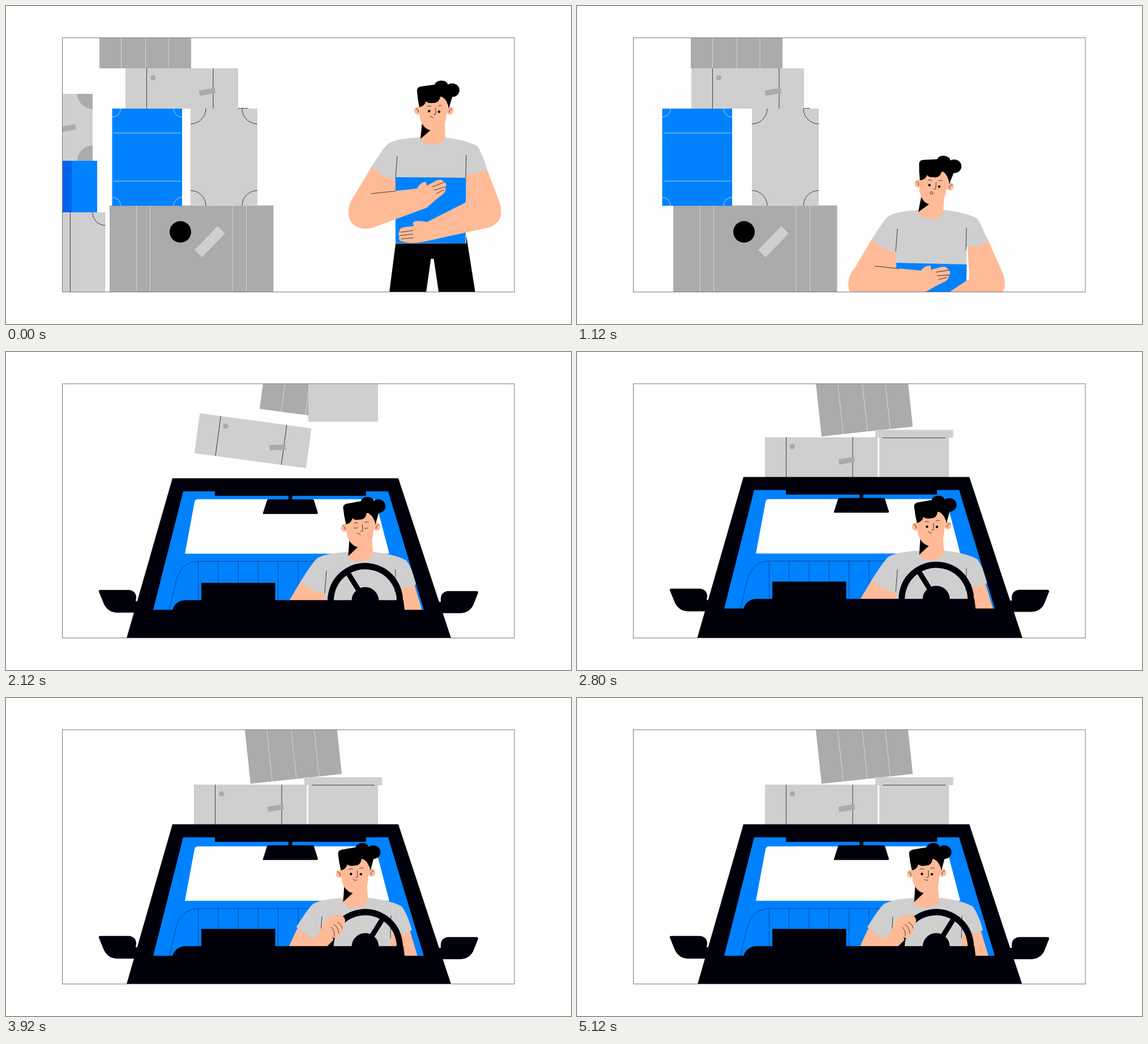
Animation, 998 px wide and 561 px high, one loop 5160 ms. Source, as an HTML page:

```html
<!DOCTYPE html>
<html lang="en">
<head>
<meta charset="utf-8">
<title>Moving day</title>
<style>
html, body { margin: 0; width: 100%; height: 100%; overflow: hidden; background: #fefefe; }
svg { display: block; width: 100vw; height: 100vh; }
.light { fill: #cfcfcf; } .dark { fill: #ababab; } .blue { fill: #0082ff; }
.skin { fill: #ffba97; } .car { fill: #00000a; }
.ink, .pale, .seam { fill: none; stroke: #222; stroke-width: .85; }
.pale { stroke: #dedede; }
.seam { stroke: #063f8c; }
</style>
</head>
<body>
<svg viewBox="0 0 998 561">
<clipPath id="stage"><rect x="99.5" y="56" width="799" height="449"/></clipPath>
<g clip-path="url(#stage)">

  <g id="leftPile">
    <path class="light" d="M20 155H153V273H20ZM20 364H175.500V505H20Z"/>
    <path class="dark" d="M126 155H153V182A27 27 0 0 1 126 155ZM153 246V273H126A27 27 0 0 1 153 246ZM80 216L122 208.500L124 217.500L80 226Z"/>
    <path class="blue" d="M100 273H161V364H100Z"/>
    <path fill="#0063ec" d="M20 273H116V364H20Z"/>
    <path class="ink" d="M113.500 364V505M153 364.500A22.500 22.500 0 0 0 175.500 387"/>
  </g>
  <g id="big">
    <circle cx="125" cy="46.500" r="19"/>
    <rect class="light" x="-29" y="-9.200" width="58.500" height="18.400" transform="translate(176.800 64) rotate(-45.700)"/>
  </g>
  <g id="blueBox"></g>
  <g id="tall"></g>
  <g id="ribbed"></g>
  <g id="crate"></g>
  <g id="lid"></g>
  <g id="long">
    <circle class="dark" cx="48.500" cy="16.500" r="4.700"/>
    <rect class="dark" x="-14.300" y="-4.700" width="28.600" height="9.400" transform="translate(144.500 41.300) rotate(-10)"/>
  </g>

  <g id="cabin">
    <path class="blue" d="M306 238H684L745 470H250Z"/>
    <path fill="#fff" d="M333 267Q334 262 339 262H648Q652 262 653 266L677 358H316Z"/>
    <path class="seam" d="M288.500 456L300 408Q308 372 341 371.500H580"/>
    <path class="seam" id="seams"/>
  </g>

  <g id="man">
    <path d="M690 405H813L829 506H764.500L755.500 446H750.500L742 506H677Z"/>
    <path id="leftArm" class="skin" d="M665 262L646 283L609 345Q599 370 613 385L650 391L689 360V290Z"/>
    <path id="rightArm" class="skin" d="M838 262L850 289L872 347Q878 368 869 380L840 391L812 360V285Z"/>
    <path class="light" d="M731 232Q695 233 676 242Q668 248 646 283Q663 302 688 306V419H813V297Q835 296 850 289Q842 260 832 247Q815 237 776 232Z"/>
    <path class="ink" d="M691 265L688 305M813 263L812 303"/>
    <path id="cargo" class="blue" d="M688 302L812.500 303L811.500 419L688 418Z"/>
    <g id="rightFore">
      <path class="skin" d="M872 347Q878 368 869 380Q862 389 848 392L737 416Q715 420 698 415Q692 411 695 407Q691 402 695 398Q694 391 705 390L721 388Q716 383 722 380Q730 378 744 381L813 346Z"/>
      <path class="ink" d="M697 399L719 396M695 405L719 402.500M698 411L720 409"/>
    </g>
    <g id="leftFore">
      <path class="skin" d="M609 345Q599 370 613 385Q626 397 648 391L743 356Q762 339 772 332Q778 326 776 321Q780 313 774 311Q769 304 760 308L743 317Q743 308 737 311Q730 314 726 322L645 331Z"/>
      <path class="ink" d="M645 331L688 326.500M753 319L774 311M756 325L776 319M760 331L774 324"/>
    </g>
    <g id="head">
      <path class="skin" d="M735 200L732 237Q740 245 755 245Q770 244 776 234L775 200Z"/>
      <path d="M735 206L750.500 218.500L732 234.500Z"/>
      <ellipse class="skin" cx="727.500" cy="184.500" rx="6.500" ry="7"/>
      <ellipse class="skin" cx="784" cy="184.500" rx="6.500" ry="7"/>
      <path class="skin" d="M729 160L731 198Q737 219 754 220Q774 217 777 200L782 160Z"/>
      <path d="M726 149Q726 143 733 142L762 138Q792 135 789 158L782 181Q780 166 770 160H767Q765 172 753 171Q745 172 742 168Q739 177 730 178.500Q727 165 726 149Z"/>
      <ellipse cx="769" cy="139.500" rx="11.500" ry="8"/>
      <ellipse cx="788" cy="148.500" rx="13" ry="12"/>
      <path class="ink" d="M724 181Q729 182 728 188M788 181Q782 183 783 188M744 177.500Q747 175 751 177M763 176.500Q767 174 770 176M759 179.500V191Q757 193 755 191"/>
      <g id="open"><circle cx="747.500" cy="185.500" r="2.200"/><circle cx="765" cy="186.500" r="2.200"/></g>
      <path id="shut" class="ink" d="M744 185Q747.500 187 751 185M762 186Q765.500 188 769 186"/>
      <path id="frown" class="ink" d="M749 195Q753 194.500 755 198"/>
      <ellipse id="puff" class="ink" cx="752.500" cy="199" rx="2.600" ry="2.200"/>
      <path id="smile" class="ink" d="M751 194Q754 199 758 196"/>
    </g>
  </g>

  <g id="frontCar">
    <g id="wheel">
      <circle cx="634.500" cy="439" r="61" fill="none" stroke="#00000a" stroke-width="11"/>
      <circle class="car" cx="634.500" cy="439" r="24"/>
      <path d="M634.500 439V380" stroke="#00000a" stroke-width="9"/>
    </g>
    <path id="driveArm" class="skin"/>
    <g id="hand">
      <path class="skin" d="M548 425L566 391Q579 380 592 383Q600 388 599 394Q598 400 595 404Q596 412 591 416Q588 423 582 424Q576 424 575 417L566 439L552 440Z"/>
      <path class="ink" d="M585 396Q592 398 594 407M579 400Q587 404 588 416M574 404Q581 410 580 421"/>
    </g>
    <path class="car" fill-rule="evenodd" d="M294 223H693L800 547H201ZM313 246L260 455H294Q300 438 318 438H345V407.500H475.500V438H702L704 455H738L675 246H636V254H369V246Z"/>
    <path class="car" d="M499 252H505.500V260H541Q543 260 544 262L551 284Q551 286 549 286H455Q453 286 454 284L461 262Q462 260 464 260H499Z"/>
    <path class="car" d="M167 420H218Q230 422 230 434L229 440H237V460H195Q180 459 173 445L164 423Q163 420 167 420Z"/>
    <path class="car" d="M831 422H780Q768 424 768 436V441H760V461H803Q820 460 826 445L834 425Q834 422 831 422Z"/>
  </g>
</g>
<rect x="99.500" y="56" width="798.500" height="448.500" fill="none" stroke="#777"/>
</svg>
<script>
const LOOP = 5160, STEP = 40, TAU = 2 * Math.PI;
const HUB = { x: 634.5, y: 439 };
const el = {};
document.querySelectorAll('[id]').forEach(e => el[e.id] = e);

const part = (t, from, to) => Math.min(1, Math.max(0, (t - from) / (to - from)));
const ramp = (t, from, to) => {
  const p = part(t, from, to);
  return p * p * (3 - 2 * p);
};

function place(id, x, y, r = 0, cx = 0, cy = 0) {
  el[id].setAttribute('transform', `translate(${x} ${y}) rotate(${r} ${cx} ${cy})`);
}

function show(id, on) {
  el[id].setAttribute('visibility', on ? 'visible' : 'hidden');
}

// Boxes: a flat face with thin lines, origin at the top left.
const ribs = (h, ...xs) => xs.map(x => `M${x} 0V${h}`).join('');
const corners = (w, h, r) => [[0, 0], [w, 0], [w, h], [0, h]].map(([x, y]) => {
  const dx = x ? -r : r, dy = y ? -r : r;
  return `M${x + dx} ${y}A${r} ${r} 0 0 ${dx * dy > 0 ? 1 : 0} ${x} ${y + dy}`;
}).join('');

function box(id, shade, w, h, lines = '', ink = 'ink') {
  el[id].insertAdjacentHTML('afterbegin',
    `<rect class="${shade}" width="${w}" height="${h}"/><path class="${ink}" d="${lines}"/>`);
}

box('big', 'dark', 289.5, 153, ribs(153, 47.5, 71.5, 217, 241.5), 'pale');
box('blueBox', 'blue', 123.5, 171.5, 'M2 43H122M2 128H122' + corners(123.5, 171.5, 15), 'pale');
box('tall', 'light', 118, 171.5, 'M-9 -.5H102' + corners(118, 171.5, 27));
box('ribbed', 'dark', 162, 120, ribs(120, 38.5, 81.5, 122), 'pale');
box('crate', 'light', 123, 71);
box('lid', 'light', 137.5, 14, 'M13 14H124');
box('long', 'light', 199, 71, ribs(71, 37.5, 155));
el.seams.setAttribute('d',
  Array.from({ length: 6 }, (_, i) => `M${339.5 + 35.3 * i} 371.5V440`).join(''));

// The stack leans, then swings back together.
const sway = (t, lean) => lean * ramp(t, 0, 600) + 19 * ramp(t, 600, 1120);

function drawStack(t) {
  const sink = 460 * part(t, 1160, 1700) ** 2;
  place('leftPile', -85 * ramp(t, 0, 560), 0);
  place('big', 183 + sway(t, -32), 352 + sink);
  place('blueBox', 187.5 + sway(t, -56), 181 + sink);
  place('tall', 326 + sway(t, -36), 181 + sink);
}

// Thrown boxes: a straight path plus a parabolic arc with spin.
function drawRoofLoad(t, bob) {
  const toss = (land) => {
    const u = part(t, 1120, land);
    return [u, 4 * u * (1 - u), u === 1 ? bob : 0];
  };
  let [u, arc, lift] = toss(2200);
  place('long', 211 + sway(t, -28) + 130 * u + 52 * arc, 110 + 43 * u - 105 * arc + lift, 28 * arc, 99.5, 35.5);
  [u, arc, lift] = toss(2300);
  place('ribbed', 165 + sway(t, 17) + 231 * u + 99 * arc, -10 + 41.5 * u - 87 * arc + lift, -6.1 * u + 25 * arc, 0, 120);

  place('crate', 534, 153 - 188 * (1 - part(t, 1800, 2270) ** 2) + bob);
  place('lid', 527, 140 - 320 * (1 - part(t, 2000, 2340) ** 2) + bob);
}

function drawMan(t, bob, drive) {
  const carry = ramp(t, 0, 1120), strain = ramp(t, 500, 1120);
  const drop = ramp(t, 1120, 1600), sit = ramp(t, 1700, 1960);
  place('man', -125 * carry - 8 * drive, 128 * carry + 8 * drop - 15 * sit + bob);
  place('head', -3 * carry - drive, 3 * carry + sit, 5 * carry - 7 * sit, 754, 220);

  place('cargo', 0, 24 * strain + 180 * drop, strain, 750, 360);
  place('leftFore', 0, -4 * strain, 12 * strain + 55 * drop, 630, 362);
  place('rightFore', 5 * strain, 4 * strain, -7 * strain - 58 * drop, 850, 368);
  place('rightArm', 0, 0, -3 * strain + 7 * sit, 830, 240);
  show('leftArm', t < 3000);

  const blink = t >= 2040 && t < 2240;
  const puffing = t >= 560 && t < 1800, smiling = t >= 3400;
  show('shut', blink);
  show('open', !blink);
  show('puff', puffing);
  show('smile', smiling);
  show('frown', !puffing && !smiling);
}

function drawSteering(t, drive) {
  const ease = 7.2 * (1 - Math.cos(Math.max(0, t - 3920) / 1200 * TAU));
  const turn = -32 + 64 * ramp(t, 3200, 3800) - ease;
  const grip = turn - 32;
  place('wheel', 0, 0, turn, HUB.x, HUB.y);
  place('hand', 0, 0, grip, HUB.x, HUB.y);

  const sin = Math.sin(grip / 360 * TAU), cos = Math.cos(grip / 360 * TAU);
  const held = (x, y) => `${HUB.x + x * cos - y * sin} ${HUB.y + x * sin + y * cos}`;
  const s = 8 - 8 * drive, elbow = 499 + 0.8 * ease;
  el.driveArm.setAttribute('d',
    `M${515 + s} 406L${elbow} 440V460L${held(-68, 0)}L${held(-56, -12)}L${held(-68, -49)}` +
    `L${546 + s} 424Q${528 + s} 420 ${515 + s} 406Z`);
  show('driveArm', t >= 3000);
  show('hand', t >= 3000);
}

function draw(t) {
  const bob = t < 2000 ? 0 : -0.9 + 2.1 * Math.cos((t - 4680) / 200 * TAU);
  const rise = 340 * (1 - ramp(t, 1680, 1960));
  const drive = ramp(t, 3000, 3700);
  drawStack(t);
  drawRoofLoad(t, bob);
  drawMan(t, bob, drive);
  place('cabin', 0, rise + bob - 2 * (1 - ramp(t, 2120, 2500)));
  place('frontCar', 0, rise + bob);
  drawSteering(t, drive);
}

function tick() {
  draw(Math.floor(performance.now() % LOOP / STEP) * STEP);
  requestAnimationFrame(tick);
}
tick();
</script>
</body>
</html>
```
